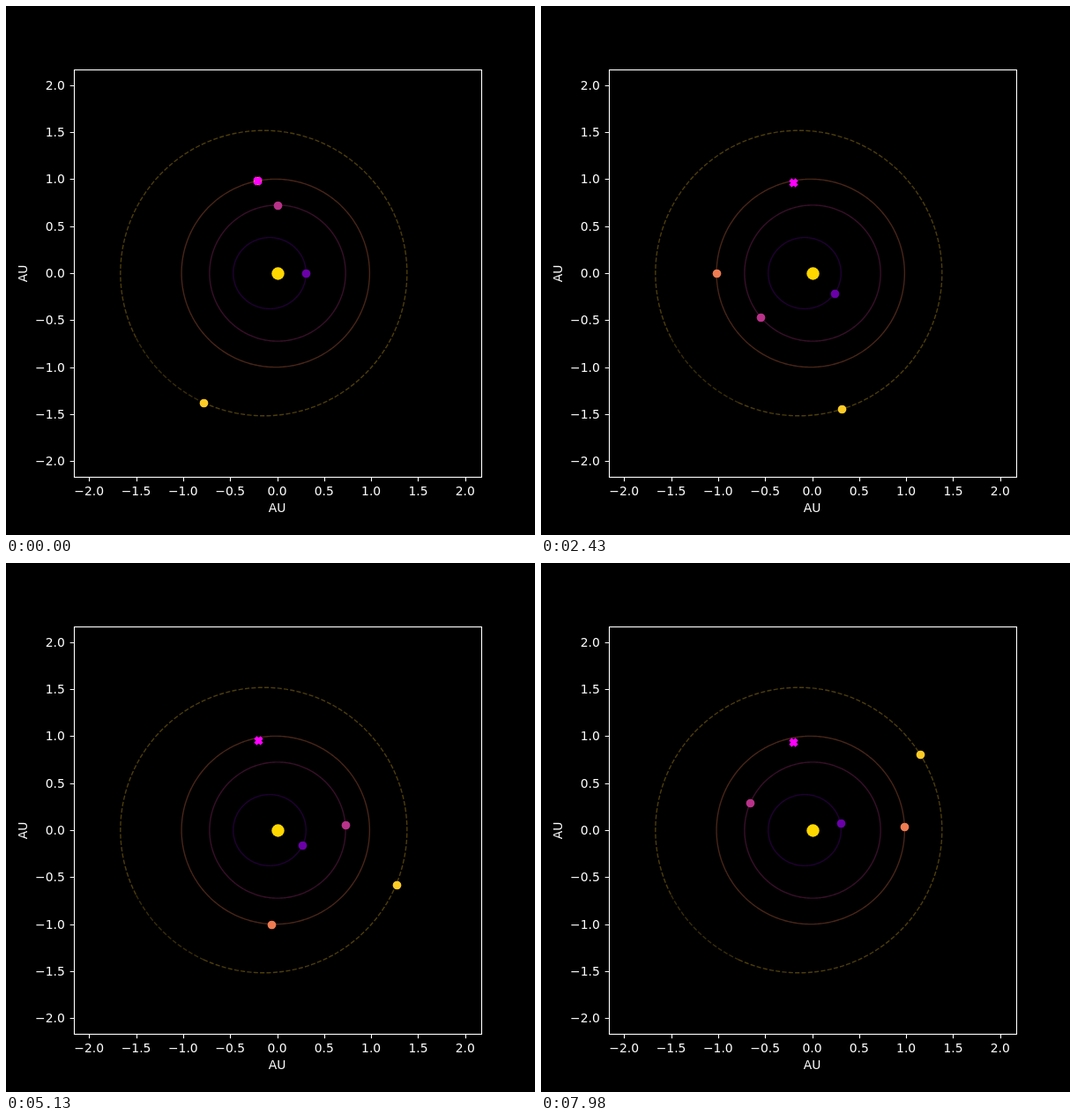
Write an HTML page that moves like this. It is 600x600 px and loops after 8 s.

```html
<!DOCTYPE html>
<html lang="en">
<head>
<meta charset="utf-8">
<title>Planet orbits</title>
<style>
  html, body { margin: 0; width: 100%; height: 100%; overflow: hidden; background: #000; }
  svg { display: block; width: 600px; height: 600px; }
  text { font: 13.89px "DejaVu Sans", sans-serif; fill: #fff; }
</style>
</head>
<body>
<svg id="stage" viewBox="0 0 600 600"></svg>
<script>
const LOOP = 8000, DAY = 30;              // one simulated day every 30 ms
const CX = 307.5, CY = 303, AU = 106.65;  // sun position and pixels per AU
const RAD = Math.PI / 180;

// a: semi-major axis, e: eccentricity (negative: perihelion on the left),
// start: mean anomaly in degrees, period: days
const planets = [
  { a: 0.3871, e: 0.2056, start: 0, period: 87.969, color: '#6a00a8' },
  { a: 0.7233, e: -0.0068, start: 90.3, period: 224.701, color: '#b83289' },
  { a: 1, e: 0.0167, start: 100, period: 365.256, color: '#ee7b51' },
  { a: 1.5237, e: 0.0934, start: 250, period: 686.98, color: '#fdcb26', dashed: true },
];

const stage = document.getElementById('stage');

function add(tag, attrs, text) {
  const el = document.createElementNS('http://www.w3.org/2000/svg', tag);
  for (const key in attrs) el.setAttribute(key, attrs[key]);
  if (text) el.textContent = text;
  return stage.appendChild(el);
}

const snap = v => Math.floor(v + 0.5) + 0.5;
const moveTo = (el, x, y) => el.setAttribute('transform', `translate(${snap(x)} ${snap(y)})`);
const onEllipse = ({ a, e }, E) => [
  CX + AU * a * (Math.cos(E) - e),
  CY - AU * a * Math.sqrt(1 - e * e) * Math.sin(E),
];

// Solve Kepler's equation for the eccentric anomaly.
function eccentricAnomaly({ e, start, period }, day) {
  const M = (start + 360 * day / period) * RAD;
  let E = M;
  for (let i = 0; i < 8; i++) E -= (E - e * Math.sin(E) - M) / (1 - e * Math.cos(E));
  return E;
}

function drawArc(planet, from, to, opacity) {
  const points = [];
  for (let i = 0; i <= 360; i++) points.push(onEllipse(planet, from + (to - from) * i / 360));
  add('polyline', {
    points: points.join(' '), fill: 'none', stroke: planet.color,
    'stroke-width': 1.39, 'stroke-opacity': opacity,
    'stroke-dasharray': planet.dashed ? '5.14 2.22' : 'none',
  });
}

function drawOrbit(planet) {
  const from = eccentricAnomaly(planet, 0), to = from + 2 * Math.PI;
  const split = planet.dashed ? to - 38 * RAD : to;
  drawArc(planet, from, split, 0.3);
  if (split < to) drawArc(planet, split, to, 0.22);
}

function drawAxes() {
  const white = { fill: 'none', stroke: '#fff', 'stroke-width': 1.11 };
  add('rect', { x: 77.5, y: 72.5, width: 462, height: 462, ...white });
  for (let v = -2; v <= 2; v += 0.5) {
    const x = snap(CX + v * AU), y = snap(CY - v * AU);
    const label = v.toFixed(1).replace('-', '\u2212');
    add('path', { d: `M${x} 534.5v4.86M77.5 ${y}h-4.86`, ...white });
    add('text', { x: CX + v * AU, y: 555, 'text-anchor': 'middle' }, label);
    add('text', { x: 66.8, y: Math.round(CY - v * AU) + 5, 'text-anchor': 'end' }, label);
  }
  add('text', { x: CX, y: 574, 'text-anchor': 'middle' }, 'AU');
  add('text', { transform: 'translate(24 303.5) rotate(-90)', 'text-anchor': 'middle' }, 'AU');
}

planets.forEach(drawOrbit);
drawAxes();
moveTo(add('circle', { r: 7.2, fill: '#ffd700' }), CX, CY);
for (const planet of planets) planet.dot = add('circle', { r: 4.85, fill: planet.color });

const u = 2.08;
const cross = add('path', {
  d: `M${-u} ${-2 * u}l${u} ${u} ${u} ${-u} ${u} ${u} ${-u} ${u} ${u} ${u} ${-u} ${u}`
   + ` ${-u} ${-u} ${-u} ${u} ${-u} ${-u} ${u} ${-u} ${-u} ${-u}z`,
  fill: '#f0f', stroke: '#f0f', 'stroke-width': 1.39,
});

function render(now) {
  const day = Math.floor(now % LOOP / DAY), t = day * DAY;
  for (const planet of planets) {
    moveTo(planet.dot, ...onEllipse(planet, eccentricAnomaly(planet, day)));
  }
  // The cross drifts slowly inward with a slight sideways sway.
  moveTo(cross, 285.3 + 1.22 * Math.sin(Math.PI * t / 13000), 198.28 + t / 1850);
  requestAnimationFrame(time => render(Math.max(0, time - startTime)));
}

const startTime = performance.now();
render(0);
</script>
</body>
</html>
```
